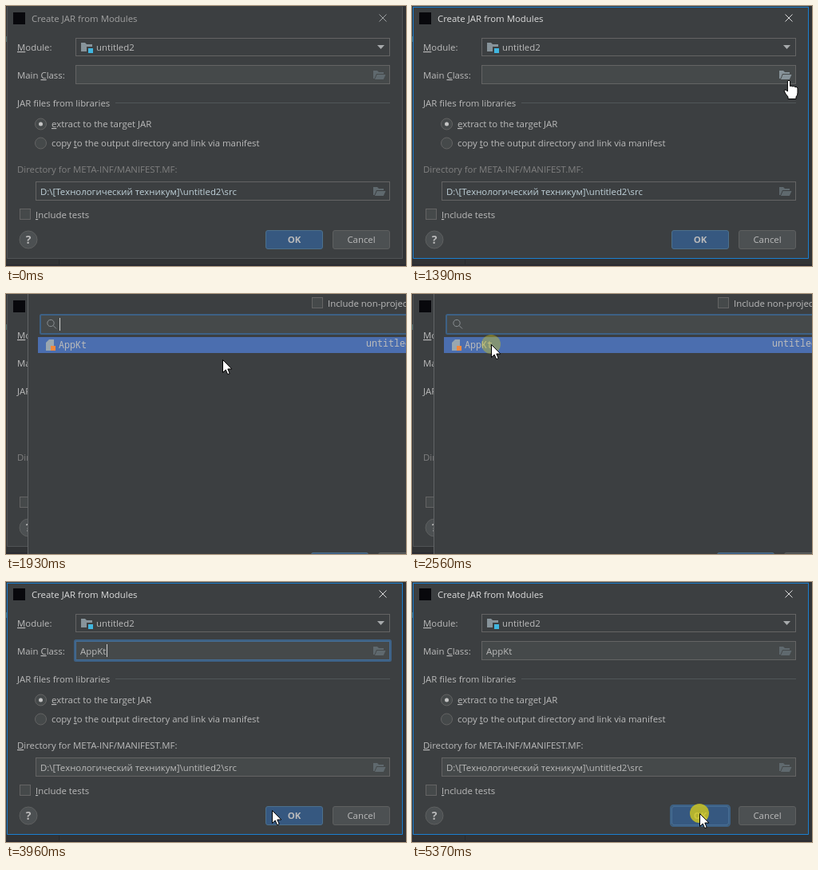
Recreate the animation shown at these times as an HTML page. Size 501 by 326 pixels, loop 5530 ms.

```html
<!DOCTYPE html>
<html lang="en">
<head>
<meta charset="utf-8">
<title>Create JAR dialog</title>
<style>
  html, body { margin: 0; width: 100%; height: 100%; overflow: hidden; background: #3c3f41; }
  svg { display: block; }
  text { font: 11.4px "Open Sans", sans-serif; fill: #bbb; white-space: pre; }
  .u, .ready .key { text-decoration: underline; }
  .bold { font-weight: 700; }
  .mono { font: 11.7px "Noto Sans Mono", monospace; }
  .title { fill: #a2a2a2; }
  .active .title { fill: #dcdcdc; }
  .path { fill: #808080; }
  .ready .path { fill: #bbb; }
  .folderText { fill: #c0d2da; }
  .ready .folderText { fill: #bbb; }
  .field { fill: #45494a; stroke: #646464; }
  .plain { fill: #3c3f41; stroke: #646464; }
  .ready .output { fill: #45494a; }
  .btn { fill: #4c5052; stroke: #5e6060; }
  .primary { fill: #365880; stroke: #4c708c; }
  .ring { fill: none; stroke: #3d6185; stroke-width: 2; }
  .inner { fill: none; stroke: #466d94; }
  .frame { fill: none; stroke: #505355; }
  .active .frame { stroke: #1b7fd0; }
  .close { stroke: #a0a3a5; }
  .active .close { stroke: #dcdcdc; }
  .line { stroke: #515658; fill: none; }
  .caret { stroke: #d0d0d0; }
  .folder { fill: #5f696e; }
  .lit { fill: #87939a; }
  .pointer { fill: #fff; stroke: #000; stroke-linejoin: round; }
</style>
</head>
<body>
<svg width="501" height="326" viewBox="0 0 501 326">
  <defs>
    <path id="folder" d="M0 0H5L7 2H13V4H4L1.5 10H0ZM4.6 5H15.5L12.8 11H2Z"/>
  </defs>

  <rect width="501" height="326" fill="#313335"/>
  <path d="M66.5 318V326" stroke="#292b2d"/>
  <path d="M0 325H501" stroke="#2a2b31" stroke-width="2"/>
  <path d="M.5 38V45" stroke="#4b6c6c"/>

  <g id="dialog">
    <rect x="1" width="496" height="317" fill="#3c3f41"/>
    <path class="frame" d="M1.5 1V316.5H496.5V1"/>
    <path id="topEdge" class="frame" d="M1 1.5H497"/>
    <rect x="9" y="8" width="15" height="15" fill="#08080c"/>
    <text class="title" x="32" y="20">Create JAR from Modules</text>
    <path class="close" d="M467.5 10.5L476.5 19.5M476.5 10.5L467.5 19.5"/>

    <text x="14" y="56"><tspan class="u">M</tspan>odule:</text>
    <rect class="plain" x="87.5" y="40.5" width="393" height="22"/>
    <path d="M94 46H99L101 48H108V57H94Z" fill="#87939a"/>
    <rect x="101" y="51" width="9" height="9" fill="#3c3f41"/>
    <rect x="103" y="53" width="6" height="6" fill="#40b6e0"/>
    <text x="113" y="56">untitled2</text>
    <path d="M465 49H474L469.5 54Z" fill="#a8abad"/>

    <text x="14" y="91">Main <tspan class="u">C</tspan>lass:</text>
    <rect class="field" x="87.5" y="74.5" width="393" height="23"/>
    <use id="browse" class="folder" href="#folder" x="460" y="81"/>
    <text id="value" x="93" y="91">AppKt</text>
    <g id="focus">
      <rect class="ring" x="86" y="73" width="396" height="26" rx="1.5"/>
      <rect class="inner" x="87.5" y="74.5" width="393" height="23"/>
    </g>
    <path id="caret" class="caret" d="M126.5 78V94"/>

    <text x="14" y="126">JAR files from libraries</text>
    <path class="line" d="M137 121.5H481"/>
    <circle class="field" cx="43.5" cy="148" r="7"/>
    <circle cx="43.5" cy="148" r="2.5" fill="#c4c4c4"/>
    <text x="57" y="152"><tspan class="u">e</tspan>xtract to the target JAR</text>
    <circle class="field" cx="43.5" cy="172" r="7"/>
    <text x="57" y="176">copy <tspan class="u">t</tspan>o the output directory and link via manifest</text>

    <text class="path" x="14" y="209"><tspan class="key">D</tspan>irectory for META-INF/MANIFEST.MF:</text>
    <rect class="plain output" x="37.5" y="220.5" width="443" height="23"/>
    <text class="folderText" x="43" y="237">D:\[Технологический техникум]\untitled2\src</text>
    <use class="folder" href="#folder" x="460" y="227"/>

    <rect class="field" x="17.5" y="254.5" width="13" height="13"/>
    <text x="37" y="266"><tspan class="u">I</tspan>nclude tests</text>

    <circle class="btn" cx="28" cy="293" r="11"/>
    <text class="bold" x="28" y="298" text-anchor="middle" style="font-size:14px">?</text>
    <rect class="primary" x="325.5" y="281.5" width="71" height="23" rx="2.5"/>
    <g id="okRing">
      <rect class="ring" x="324" y="280" width="74" height="26" rx="3.5"/>
      <rect class="inner" x="325.5" y="281.5" width="71" height="23" rx="2.5"/>
    </g>
    <text class="bold" x="361" y="297" text-anchor="middle">OK</text>
    <rect class="btn" x="409.5" y="281.5" width="71" height="23" rx="2.5"/>
    <text x="445" y="297" text-anchor="middle">Cancel</text>
  </g>

  <g id="popup">
    <rect x="27.5" y="-1" width="480" height="330" fill="#3c3f41" stroke="#616466"/>
    <rect class="field" x="383.5" y="4.5" width="13" height="13"/>
    <text x="403" y="16">Include non-project items</text>
    <rect class="field" x="43.5" y="26.5" width="470" height="23"/>
    <rect class="ring" x="43" y="26" width="470" height="24" rx="1.5"/>
    <g fill="none" stroke="#8b9093">
      <circle cx="56" cy="36.5" r="4.2"/>
      <path d="M59 39.5L63 43.5"/>
    </g>
    <path id="searchCaret" class="caret" d="M67.5 30V46"/>
    <text id="empty" x="246" y="148" style="fill:#787878">Nothing to show</text>
    <rect class="btn" x="382.5" y="324.5" width="71" height="23" rx="2.5"/>
    <rect class="btn" x="466.5" y="324.5" width="71" height="23" rx="2.5"/>
    <g id="found">
      <rect x="40" y="54" width="461" height="20" fill="#4b6eaf"/>
      <path d="M54 57H60V71H50V61Z" fill="#9aa7b0"/>
      <rect x="56" y="65" width="6" height="6" fill="#f0883e"/>
      <text class="mono" x="66" y="68">AppKt</text>
      <text class="mono" x="451" y="66">untitled2</text>
      <rect class="primary" x="382.5" y="324.5" width="71" height="23" rx="2.5"/>
    </g>
  </g>

  <g id="cursor">
    <circle id="click" r="12" fill="#d4ca1c"/>
    <path id="arrow" class="pointer" d="M.5 .5V16.5L4.2 13 6.7 18.7 9.2 17.6 6.8 12H11.8Z"/>
    <path id="hand" class="pointer" d="M-1.6 1.2Q0 -.8 1.6 1.2V7.6Q3 6.4 4.6 7.9Q6.4 7 7.8 8.6Q10.4 8 11 10V16Q11 19 9 21V23.5H-1V21Q-4 17.5 -5.8 14Q-6.4 11.6 -3.8 12.2L-1.6 14Z"/>
  </g>
</svg>

<script>
const LOOP = 5530, ENTER = 370, POPUP = 1550, CHOSEN = 2800, PRESS = 5290;
const $ = id => document.getElementById(id);
const show = (id, on) => { $(id).style.display = on ? '' : 'none'; };
const within = (t, a, b) => t >= a && t < b;

const power = n => p => p ** n;
const smooth = p => p * p * (3 - 2 * p);
const linear = power(1);

// first step, last step, step count, end x, end y, easing
const MOVES = [
  [450, 920, 7, 472, 93, p => 1 - (1 - p) ** 1.7],
  [POPUP, POPUP, 1, 468, 82, linear],
  [1630, 1930, 5, 271, 82, power(1.6)],
  [2010, 2090, 2, 115, 72, power(.8)],
  [2170, 2250, 2, 99, 63, linear],
  [3020, 3100, 2, 104, 58, linear],
  [3260, 3810, 8, 333, 283, smooth],
  [3890, 3960, 2, 333, 286, linear],
  [4360, 4600, 4, 360, 294, smooth],
  [4680, 4830, 3, 360, 290, linear]
];

// press, fade, release
const CLICKS = [[1000, 1150, 1230], [2400, 2560, 2640], [PRESS, LOOP, LOOP]];

function pointerAt(t) {
  let x = 401, y = 279;
  for (const [from, to, steps, endX, endY, ease] of MOVES) {
    if (t < from) break;
    const gap = (to - from) / Math.max(1, steps - 1) || 1;
    const done = Math.min(steps, Math.floor((t - from + 2) / gap) + 1);
    const p = ease(done / steps);
    x += (endX - x) * p;
    y += (endY - y) * p;
  }
  return [Math.round(x), Math.round(y)];
}

function clickAlpha(t) {
  const hit = CLICKS.find(([press, , release]) => within(t, press, release));
  return !hit ? 0 : t < hit[1] ? .8 : .4;
}

function draw(t) {
  const chosen = t >= CHOSEN;
  const popup = within(t, POPUP, CHOSEN);
  const active = chosen || within(t, 1390, POPUP);
  const focused = within(t, CHOSEN, PRESS);
  const found = t >= 1710;
  const [x, y] = pointerAt(t);
  const overBrowse = t < POPUP && x > 458 && y < 98;

  $('dialog').setAttribute('class', (active ? 'active ' : '') + (chosen ? 'ready' : ''));
  show('topEdge', active);
  show('value', chosen);
  show('focus', focused);
  show('caret', focused && !within(t, 3340, 3810) && !within(t, 4360, 4830));
  show('okRing', t >= PRESS);
  $('browse').setAttribute('class', overBrowse ? 'lit' : 'folder');

  show('popup', popup);
  show('found', found);
  show('empty', !found);
  show('searchCaret', t < 2560);

  show('cursor', t >= ENTER);
  $('cursor').setAttribute('transform', `translate(${x} ${y})`);
  show('hand', overBrowse);
  show('arrow', !overBrowse);
  $('click').setAttribute('opacity', clickAlpha(t));
}

const start = performance.now();
function tick() {
  draw((performance.now() - start) % LOOP);
  requestAnimationFrame(tick);
}
tick();
</script>
</body>
</html>
```
